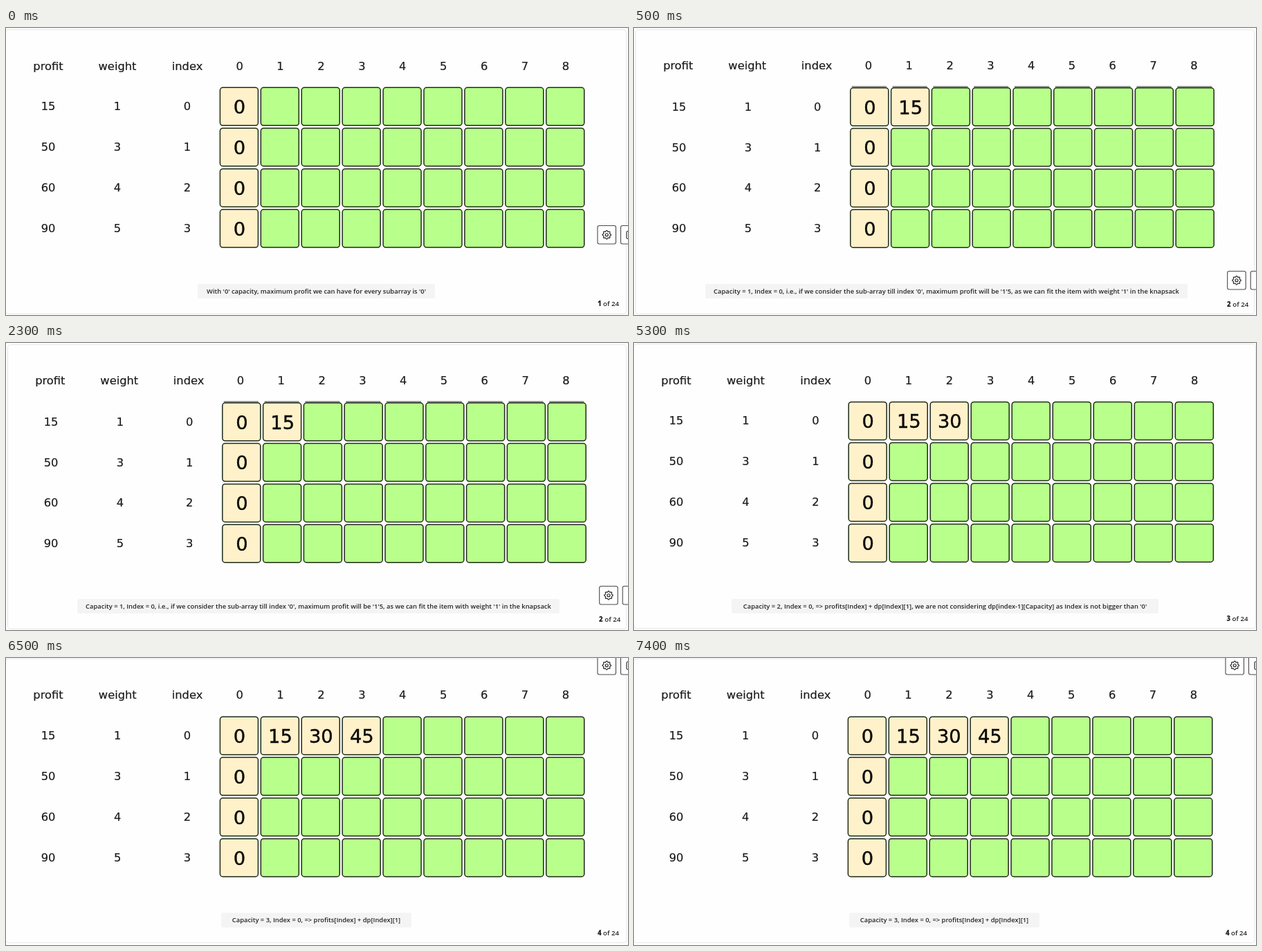
An HTML page for the animation above (8000 ms loop, 899 by 416 pixels).

```html
<!DOCTYPE html>
<html lang="en">
<head>
<meta charset="utf-8">
<title>Knapsack table</title>
<style>
  html, body { margin: 0; width: 100%; height: 100%; overflow: hidden; background: #fefefe; }
  svg { display: block; width: 100%; height: 100%; }
  text { text-anchor: middle; fill: #1c1c1c; stroke: #1c1c1c; stroke-width: 0.2; font: 16.3px "DejaVu Sans", sans-serif; }
  .value { font-size: 27.3px; fill: #0a0a0a; stroke: #0a0a0a; stroke-width: 0.4; }
  .note, .page { font: 600 9.4px "Open Sans", sans-serif; fill: #262626; stroke: none; }
  .page { font-size: 9.7px; }
  .page tspan { font-weight: 800; }
  .cell { stroke: #1e2a18; stroke-width: 1.5; }
  .line { fill: none; stroke: #2b2b2b; stroke-width: 1.2; }
  .button { fill: #fff; stroke: #4a4a4a; stroke-width: 1.1; }
  .frame { fill: #fefefe; stroke: #e8e8e8; }
</style>
</head>
<body>
<svg id="stage" viewBox="0 0 899 416"></svg>
<script>
const stage = document.getElementById('stage');
const LOOP = 8000;
const CELL = 55;
const items = [[15, 1], [50, 3], [60, 4], [90, 5]];

// x, y: first cell; step: cell pitch; head: [column shift, digit x, baseline]
const slides = [
  { start: 0, x: 309.4, y: 86.3, step: 58.92, cols: [61, 161, 262], head: [0, 337.6, 60.5],
    frame: [-0.5, 2.5, 897, 412], note: [277, 371, 343], page: [870.5, 403], button: [855, 286.5],
    text: "With '0' capacity, maximum profit we can have for every subarray is '0'" },
  { start: 500, x: 312.8, y: 86.8, step: 58.8, cols: [65, 165, 265.3], head: [-1.2, 339, 60.2],
    frame: [2.5, 2.5, 894, 412], note: [103, 371, 697], page: [872.7, 403.5], button: [857.7, 352.5],
    torn: true,
    text: "Capacity = 1, Index = 0, i.e., if we consider the sub-array till index '0', maximum profit will be '1'5, as we can fit the item with weight '1' in the knapsack" },
  { start: 3500, x: 310.2, y: 85.4, step: 59.02, cols: [61, 161.5, 262.5], head: [0, 338, 59.5],
    frame: [-0.5, 1.5, 899, 412], note: [141, 371, 617], page: [872, 403],
    text: "Capacity = 2, Index = 0, => profits[Index] + dp[Index][1], we are not considering dp[index-1][Capacity] as Index is not bigger than '0'" },
  { start: 6500, x: 309.4, y: 85.2, step: 58.92, cols: [61, 161.3, 262], head: [0, 337.6, 59.4],
    frame: [-0.5, 1.2, 897.5, 411.5], note: [311, 369.5, 275], page: [870.5, 402], button: [855, -2.5],
    text: "Capacity = 3, Index = 0, => profits[Index] + dp[Index][1]" }
];

const escapeText = s => String(s).replace(/&/g, '&amp;').replace(/</g, '&lt;').replace(/>/g, '&gt;');
const label = (x, y, s, name = '') => `<text class="${name}" x="${x}" y="${y}">${escapeText(s)}</text>`;
const box = (x, y, w, h, r, name, more = '') =>
  `<rect class="${name}" x="${x}" y="${y}" width="${w}" height="${h}" rx="${r}" ${more}/>`;

function gear(cx, cy) {
  const points = Array.from({ length: 64 }, (_, i) => {
    const a = i * Math.PI / 32;
    const r = 5.5 + 0.75 * Math.cos(8 * a);
    return (cx + r * Math.cos(a)).toFixed(2) + ',' + (cy + r * Math.sin(a)).toFixed(2);
  });
  return `<polygon class="line" points="${points.join(' ')}"/><circle class="line" cx="${cx}" cy="${cy}" r="2"/>`;
}

function buttons([x, y]) {
  return box(x, y, 26.5, 26.5, 2.5, 'button') + gear(x + 13.25, y + 13.25) +
    box(x + 33.5, y, 26.5, 26.5, 2.5, 'button') + box(x + 42, y + 8, 11, 11, 1.5, 'line');
}

function table(s, count) {
  const { x, y, step } = s;
  const [shift, digitX, headY] = s.head;
  let out = ['profit', 'weight', 'index'].map((t, i) => label(s.cols[i] + shift, headY, t)).join('');
  for (let c = 0; c < 9; c++) {
    const left = x + c * step;
    out += label(digitX + c * step, headY, c);
    if (s.torn) out += `<path class="line" d="M${left + 2} ${y - 1.8}h50"/>`;
  }
  items.forEach((item, r) => {
    const top = y + r * step;
    [...item, r].forEach((v, i) => { out += label(s.cols[i], top + 33, v); });
    for (let c = 0; c < 9; c++) {
      const left = x + c * step;
      const filled = c === 0 || (r === 0 && c <= count);
      out += box(left, top, CELL, CELL, 4, 'cell', `fill="${filled ? '#fff1c9' : '#b8ff8b'}"`);
      if (filled) out += label(left + CELL / 2 + 0.6, top + 37.7, c * 15, 'value');
    }
  });
  return out;
}

function slideMarkup(s, i) {
  const [fx, fy, fw, fh] = s.frame;
  const [nx, ny, nw] = s.note;
  const [px, py] = s.page;
  return box(fx, fy, fw, fh, 4, 'frame') + table(s, i) +
    box(nx, ny, nw, 21, 2, '', 'fill="#f4f4f4"') +
    label(nx + nw / 2, ny + 13.6, s.text, 'note') +
    `<text class="page" x="${px}" y="${py}"><tspan>${i + 1}</tspan> of 24</text>` +
    (s.button ? buttons(s.button) : '');
}

stage.innerHTML = slides.map((s, i) => `<g>${slideMarkup(s, i)}</g>`).join('');
const groups = [...stage.children];

function render(ms) {
  const t = ms % LOOP;
  const current = slides.reduce((found, s, i) => t >= s.start ? i : found, 0);
  groups.forEach((g, i) => g.setAttribute('display', i === current ? 'inline' : 'none'));
}

const begin = performance.now();
function tick() {
  render(performance.now() - begin);
  requestAnimationFrame(tick);
}
tick();
</script>
</body>
</html>
```
